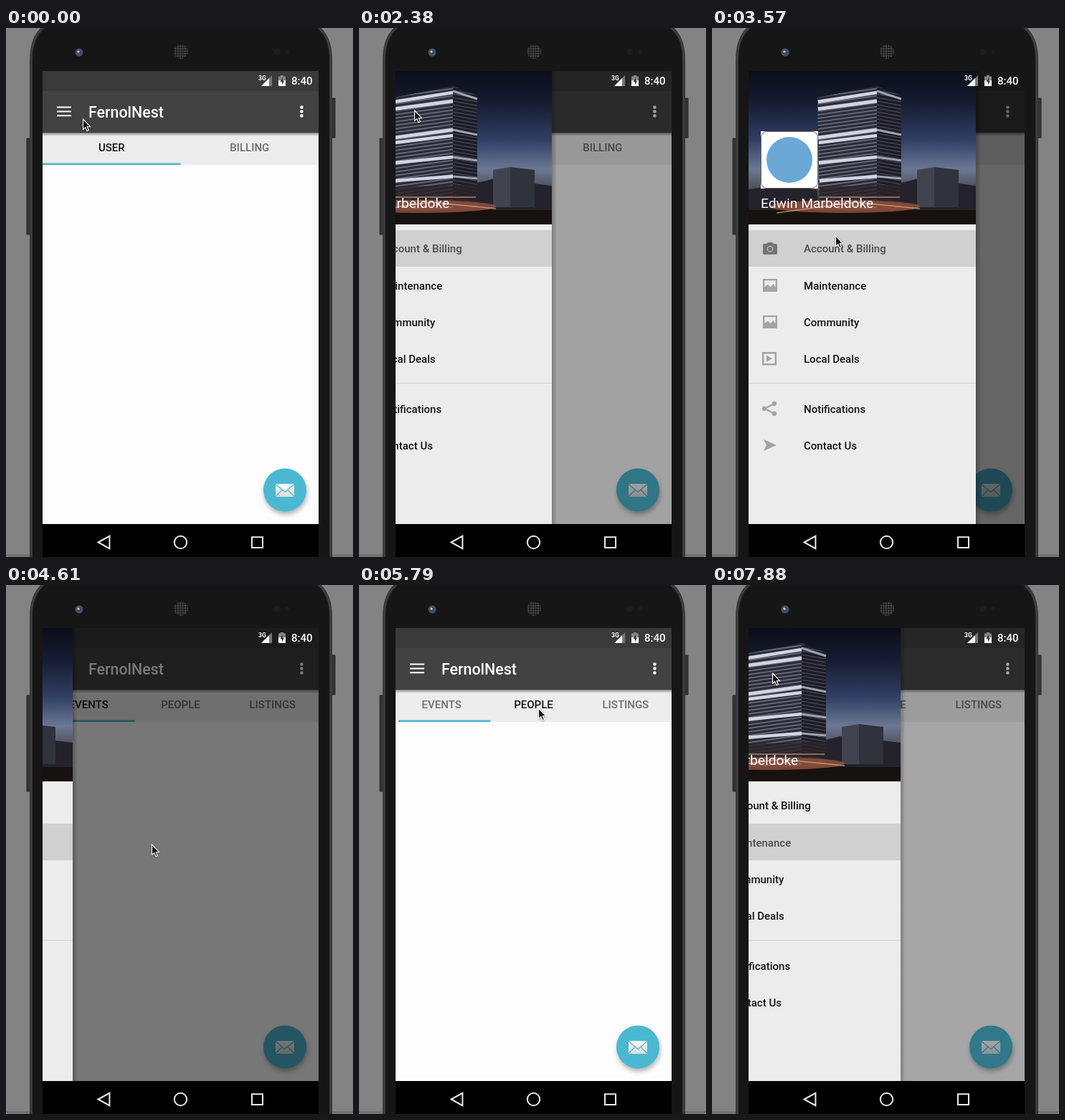
Write an HTML page that moves like this. It is 484 px wide and 738 px high and loops after 8 s.

```html
<!DOCTYPE html>
<html lang="en">
<head>
<meta charset="utf-8">
<title>Navigation drawer demo</title>
<style>
  html, body { margin: 0; width: 100%; height: 100%; overflow: hidden; background: #838383; }
  svg { display: block; font: 500 15px Roboto, sans-serif; }
  .tab { text-anchor: middle; }
  .item { fill: #151515; }
  .item path { fill: #a3a3a3; fill-rule: evenodd; }
  .item.on { fill: #4c4c4c; }
  .item.on path { fill: #757575; }
  #fab { filter: drop-shadow(1px 4px 3px rgba(0, 0, 0, .3)); }
  #cursor { filter: drop-shadow(0 1px 1px rgba(0, 0, 0, .4)); }
</style>
</head>
<body>
<svg width="484" height="738" viewBox="0 0 484 738">
  <defs>
    <clipPath id="screen"><path d="M51 60H436V692H51z"/></clipPath>
    <clipPath id="photo"><path d="M51 60H368V274H51z"/></clipPath>
    <pattern id="mesh" width="3.4" height="3.4" patternUnits="userSpaceOnUse">
      <circle cx="1.7" cy="1.7" r="1.2" fill="#555"/>
    </pattern>
    <pattern id="floors" width="8" height="5" patternUnits="userSpaceOnUse" patternTransform="skewY(-8)">
      <path d="M0 0H8V5H0z" fill="#2a2b37"/><path d="M0 1H8V2.5H0z" fill="#767a8a"/>
    </pattern>
    <pattern id="sideFloors" width="8" height="5" patternUnits="userSpaceOnUse" patternTransform="skewY(10)">
      <path d="M0 0H8V5H0z" fill="#1c1d27"/><path d="M0 1H8V2H0z" fill="#50535f"/>
    </pattern>
    <linearGradient id="sky" x2="0" y2="1">
      <stop stop-color="#0b0e1a"/><stop offset=".2" stop-color="#151b30"/>
      <stop offset=".45" stop-color="#303f65"/><stop offset=".64" stop-color="#6b7894"/>
      <stop offset=".78" stop-color="#4c4a54"/><stop offset="1" stop-color="#15110f"/>
    </linearGradient>
    <linearGradient id="down" x2="0" y2="1">
      <stop stop-opacity=".35"/><stop offset="1" stop-opacity="0"/>
    </linearGradient>
    <linearGradient id="right">
      <stop stop-opacity=".24"/><stop offset="1" stop-opacity=".04"/>
    </linearGradient>
    <linearGradient id="paper" x2="0" y2="1">
      <stop stop-color="#fafafa"/><stop offset="1" stop-color="#dcdcdc"/>
    </linearGradient>
  </defs>

  <!-- Phone -->
  <path d="M0 0H484V738H0z" fill="#838383"/>
  <path d="M0 734H484V738H0z" opacity=".12"/>
  <path d="M29 154H35V288H29zM453 98H459V153H453z" fill="#343434" stroke="#262626"/>
  <path d="M35 745V46C35 24 40 8 56-4H432C448 8 453 24 453 46V745z" fill="#161616" stroke="#333" stroke-width="4"/>
  <path d="M35 745V46C35 24 40 8 56-4M453 745V46C453 24 448 8 432-4" fill="none" stroke="#4d4d4d"/>
  <circle cx="102" cy="34" r="5.5" fill="#4c535e"/>
  <circle cx="102.3" cy="34.3" r="3.5" fill="#3a4a70"/>
  <circle cx="101" cy="33" r="1.6" fill="#cfd6e0"/>
  <circle cx="244" cy="33" r="10" fill="url(#mesh)"/>
  <circle cx="378" cy="33" r="4.5" fill="#1f1c1c"/>
  <circle cx="392" cy="33" r="3" fill="#1f1c1c"/>

  <g clip-path="url(#screen)">
    <!-- App -->
    <path d="M51 60H436V692H51z" fill="#fdfdfd"/>
    <text id="page" y="290" font-size="23.5" font-weight="400" fill="#212121">Name</text>
    <path d="M51 146H436V191H51z" fill="#ededed"/>
    <path d="M51 146.6H436V151H51z" fill="url(#down)"/>
    <text class="tab" y="171.5"/><text class="tab" y="171.5"/><text class="tab" y="171.5"/>
    <rect id="marker" y="188.5" height="2.5" fill="#4bb2cf"/>
    <path d="M51 60H436V87H51z" fill="#3a3a3a"/>
    <path d="M51 86.7H436V146.6H51z" fill="#424242"/>
    <path d="M51 87H436" stroke="#353535"/>
    <path d="M71 110.5H91M71 116.5H91M71 122.3H91" stroke="#fff" stroke-width="2.1"/>
    <text x="115" y="125" font-size="21.4" fill="#fff">FernolNest</text>
    <path d="M412.4 110.5h0m0 6h0m0 6h0" stroke="#fff" stroke-width="4.6" stroke-linecap="round"/>
    <circle id="fab" cx="389" cy="644.5" r="30" fill="#4bb8d2"/>
    <path d="M376 636H402V654H376z" fill="url(#paper)"/>
    <path d="M376 636.5L389 647.5 402 636.5M376 653.5L385 644.5M402 653.5L393 644.5" fill="none" stroke="#4bb8d2" stroke-width="1.2"/>
    <path id="scrim" d="M51 60H436V692H51z"/>

    <g id="drawer">
      <path id="edge" d="M368 60H374V692H368z" fill="url(#right)"/>
      <path d="M51 60H368V692H51z" fill="#ececec"/>
      <g clip-path="url(#photo)">
        <path d="M51 60H368V274H51z" fill="url(#sky)"/>
        <path d="M51 225L100 218 147 226V274H51zM264 216L288 210 368 220V274H264z" fill="#24222a"/>
        <path d="M286 198L310 194V250H286z" fill="#41434e"/>
        <path d="M310 194L344 198V250H310z" fill="#30323c"/>
        <path d="M147 97L230 81V252H150z" fill="url(#floors)"/>
        <path d="M230 81L264 94V246L230 252z" fill="url(#sideFloors)"/>
        <path d="M148 103L230 90M148 113L230 102M148 153L230 142M149 160L230 150M149 188L230 180M150 213L230 207" fill="none" stroke="#d3d6e2" stroke-width="4.5"/>
        <path d="M230 88L264 99M230 142L264 149M230 180L264 185M230 207L264 210" fill="none" stroke="#9fa3b2" stroke-width="3"/>
        <path d="M150 222L264 218V246H150z" fill="#2b2429" opacity=".8"/>
        <path d="M51 254H368V274H51z" fill="#17110f"/>
        <ellipse cx="185" cy="249" rx="105" ry="9" fill="#a65a43" opacity=".7"/>
        <path d="M90 258L200 243 290 252M150 236H262" fill="none" stroke="#e0ab88" stroke-width="1.5" opacity=".7"/>
      </g>
      <path d="M68 144H148V224H68z" fill="#fff"/>
      <rect x="68.5" y="144.5" width="79" height="79" rx="8" fill="#fff" stroke="#666"/>
      <circle cx="108" cy="184" r="32" fill="#6ba8d5"/>
      <text x="68" y="251" font-size="19.25" font-weight="400" fill="#fff">Edwin Marbeldoke</text>
      <rect id="highlight" x="51" width="317" height="51" fill="#d0d0d0"/>
      <path d="M51 495.5H368" stroke="#cfcfcf"/>
      <g id="menu"></g>
    </g>
  </g>

  <!-- System bars -->
  <g fill="#fff">
    <text x="352" y="73" font-size="8.5" font-weight="700">3G</text>
    <path d="M356 81L371 66V81z" fill="#777"/><path d="M356 81L367 70V81z"/>
    <path d="M380 67.5H383V66H387V67.5H390V81H380z" fill="#858585"/><path d="M380 73H390V81H380z"/>
    <path d="M386 69L382.5 75H385V79.5L388 73.5H386z" fill="#333"/>
    <text x="398" y="79.3">8:40</text>
  </g>
  <path d="M51 692H436V738H51z"/>
  <g fill="none" stroke="#e9e9e9" stroke-width="2">
    <path d="M128.6 717.5L144.4 708.8V726.2z"/>
    <circle cx="243.5" cy="717.5" r="8.7"/>
    <path d="M343 710.2H358V725H343z"/>
  </g>
  <path id="cursor" d="M.5 0V14.5L3.8 11.6 6 16.8 8.4 15.8 6.2 10.7H10.5z" fill="#111" stroke="#fff" stroke-width="1.1"/>
</svg>

<script>
const LOOP = 8000, TICK = 148.6, ROW = 51.33;
const $ = id => document.getElementById(id);
const tabs = [...document.querySelectorAll('.tab')];

const image = 'M2 3H22V21H2zM4.3 5.2V14L9 10.8l3.5 3.4 4-4 3.2 4V5.2z';
const menu = [
  ['Account & Billing', 'M9 3 7.2 5H4a2 2 0 0 0-2 2v11a2 2 0 0 0 2 2h16a2 2 0 0 0 2-2V7a2 2 0 0 0-2-2h-3.2L15 3zM12 8a4.2 4.2 0 1 1 0 8.4 4.2 4.2 0 0 1 0-8.4zM12 9a3.2 3.2 0 1 0 0 6.4 3.2 3.2 0 0 0 0-6.4z'],
  ['Maintenance', image],
  ['Community', image],
  ['Local Deals', 'M1 2H21V20.5H1zM3.4 4.4V18.1H18.6V4.4zM7 6.8V15.8L15 11.3z'],
  ['Notifications', 'M14.6 5a3.2 3.2 0 1 0 6.4 0 3.2 3.2 0 1 0-6.4 0M1 12a3.2 3.2 0 1 0 6.4 0 3.2 3.2 0 1 0-6.4 0M14.6 19a3.2 3.2 0 1 0 6.4 0 3.2 3.2 0 1 0-6.4 0M6.4 9.7l8.2-4.2 1 2-8.2 4.2zM6.4 14.3l8.2 4.2 1-2-8.2-4.2z'],
  ['Contact Us', 'M3 4 21 12 3 20 7 12z'],
];
$('menu').innerHTML = menu.map(([label, icon], i) => {
  const y = 308.2 + ROW * i + (i > 3 ? 18 : 0);
  return `<g class="item"><path transform="translate(69 ${Math.floor(y) - 12})" d="${icon}"/>` +
    `<text x="128" y="${Math.round(y + 5.2)}">${label.replace('&', '&amp;')}</text></g>`;
}).join('');
const items = [...document.querySelectorAll('.item')];

// Pointer stops: tick, x, y
const path = [
  [0, 107, 127], [2, 69, 102], [11, 69, 102], [13, 77, 115], [23, 77, 115],
  [24, 172, 290], [28, 203, 362], [33, 203, 362], [37, 250, 172], [39, 250, 172],
  [41, 357, 172], [45, 357, 172], [48, 115, 165], [49, 115, 165], [51, 84, 123], [54, 84, 123],
];

function pointerAt(tick) {
  const i = path.findIndex(stop => stop[0] > tick);
  const [t0, x0, y0] = path[i - 1], [t1, x1, y1] = path[i];
  const u = (tick - t0) / (t1 - t0);
  return [x0 + (x1 - x0) * u, y0 + (y1 - y0) * u];
}

// Quintic ease-out from 0 to 1
function settle(t, start, duration) {
  const u = Math.min(1, Math.max(0, (t - start) / duration));
  return 1 - (1 - u) ** 5;
}

const drawerAt = (t, openLag, closeLag) =>
  settle(t, 2221.6 + openLag, 750) - settle(t, 4447 + closeLag, 480) + settle(t, 7727 + openLag, 750);

function draw(tick) {
  const t = tick * TICK;
  const section = tick < 30 ? 0 : 1;
  const labels = section ? ['EVENTS', 'PEOPLE', 'LISTINGS'] : ['USER', 'BILLING'];
  const selected = tick < 39 ? 0 : tick < 43 ? 1 : tick < 47 ? 2 : 0;
  const pager = settle(t, 5793.5, 300) + settle(t, 6388, 300) - 2 * settle(t, 6982, 400);
  const width = 385 / labels.length;

  tabs.forEach((tab, i) => {
    tab.textContent = labels[i] || '';
    tab.setAttribute('x', 51 + width * (i + .5));
    tab.setAttribute('fill', i === selected ? '#141414' : '#707070');
  });
  $('marker').setAttribute('x', 51 + width * pager);
  $('marker').setAttribute('width', width);
  $('page').setAttribute('x', 90 - 385 * pager);
  $('page').setAttribute('visibility', tick < 46 ? 'hidden' : 'visible');

  const open = drawerAt(t, 0, 0);
  $('drawer').setAttribute('transform', `translate(${Math.round(317 * (open - 1))})`);
  $('edge').setAttribute('opacity', open > .002 ? 1 : 0);
  $('scrim').setAttribute('opacity', .6 * drawerAt(t, 30, 148));
  $('highlight').setAttribute('y', 282 + Math.floor(ROW) * section);
  items.forEach((item, i) => item.classList.toggle('on', i === section));

  $('cursor').setAttribute('transform', `translate(${pointerAt(tick)})`);
}

function loop() {
  draw(Math.floor(performance.now() % LOOP / (TICK - .2)));
  requestAnimationFrame(loop);
}
loop();
</script>
</body>
</html>
```
